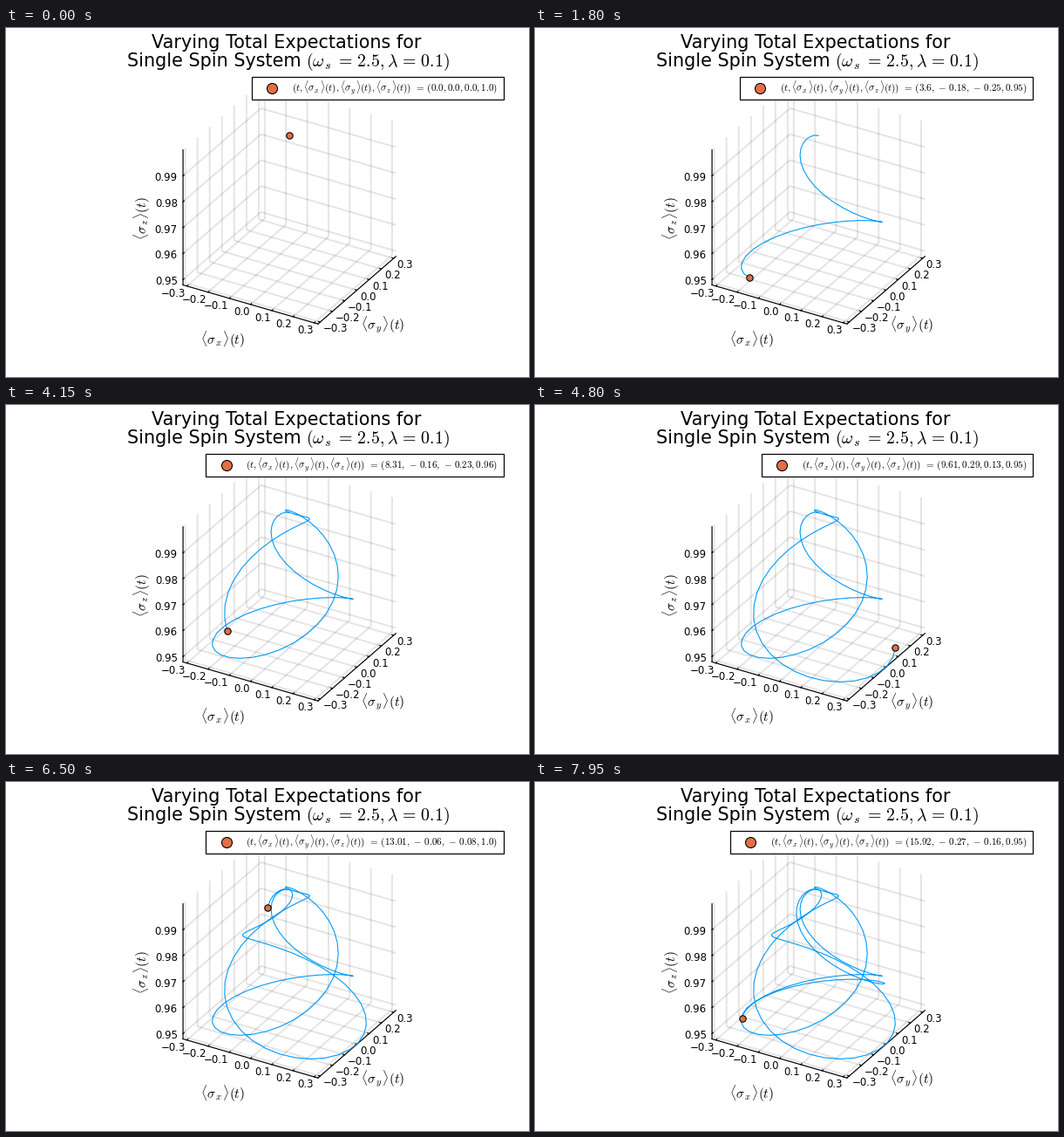
A matplotlib script for the animation above (8000 ms loop, 600 by 400 pixels).

```python
import numpy as np
import matplotlib.pyplot as plt
from matplotlib.animation import FuncAnimation
from matplotlib.patches import Rectangle

plt.rcParams["font.family"] = "DejaVu Sans"
plt.rcParams["mathtext.fontset"] = "cm"

W, H, DPI = 600, 400, 100
FRAMES, INTERVAL = 160, 50
PX = 72 / DPI
TITLE, TICK, GUIDE, LEGEND = 14.93, 8.5, 11, 8

# Spin precessing at OMEGA_S under a weak rotating field
OMEGA_S, OMEGA_D, DRIVE = 2.5, 1.5, 0.1635
T = np.linspace(0, 100, 1000)


def spin(t):
    detune = OMEGA_S - OMEGA_D
    rabi = np.hypot(detune, DRIVE)
    sin_a, cos_a = DRIVE / rabi, detune / rabi
    c, s = np.cos(rabi * t / 2), np.sin(rabi * t / 2)
    xy = 0 - 2 * sin_a * s * (c + 1j * cos_a * s) * np.exp(1j * OMEGA_D * t)
    return xy.real, xy.imag, 1 - 2 * (sin_a * s) ** 2


X, Y, Z = spin(T)
LIMS = [(v.min(), v.max()) for v in (X, Y, Z)]

# Orthographic view: azimuth 30, elevation 30
SIDE, CX, CY = 178.8, 325.2, 200.7
C30 = np.cos(np.pi / 6)


def project(x, y, z):
    u, v, w = [(a - lo) / (hi - lo) - 0.5
               for a, (lo, hi) in zip((x, y, z), LIMS)]
    return (CX + SIDE * (C30 * u + 0.5 * v),
            CY + SIDE * (0.25 * u - 0.5 * C30 * v - C30 * w))


fig = plt.figure(figsize=(W / DPI, H / DPI), dpi=DPI, facecolor="white")
ax = fig.add_axes([0, 0, 1, 1])
ax.set_xlim(0, W)
ax.set_ylim(H, 0)
ax.axis("off")


def line3(p, q, **kw):
    (x0, y0), (x1, y1) = project(*p), project(*q)
    ax.plot([x0, x1], [y0, y1], snap=False, **kw)


def text(x, y, s, size, **kw):
    return ax.text(x, y, s, fontsize=size, **kw)


def roomy(s):
    """Widen the gaps around math operators."""
    for op in "=-":
        s = s.replace(op, rf"\hspace{{0.14}}{op}\hspace{{0.14}}")
    return f"${s}$"


def sub(base, index):
    return rf"{base}_{{\hspace{{0.15}}{index}\hspace{{0.15}}}}"


def mean(axis):
    return rf"\langle{sub(chr(92) + 'sigma', axis)}\rangle(t)"


(x0, x1), (y0, y1), (z0, z1) = LIMS
XY_TICKS = np.arange(-3, 4) / 10
Z_TICKS = np.arange(95, 100) / 100
GRID = dict(color="black", alpha=0.1, lw=2 * PX, solid_capstyle="butt", zorder=1)
AXIS = dict(color="black", lw=1.2 * PX, zorder=2)

for v in XY_TICKS:
    line3((v, y0, z0), (v, y1, z0), **GRID)
    line3((v, y1, z0), (v, y1, z1), **GRID)
    line3((x0, v, z0), (x1, v, z0), **GRID)
    line3((x0, v, z0), (x0, v, z1), **GRID)
for v in Z_TICKS:
    line3((x0, y0, v), (x0, y1, v), **GRID)
    line3((x0, y1, v), (x1, y1, v), **GRID)

line3((x0, y0, z0), (x1, y0, z0), **AXIS)
line3((x1, y0, z0), (x1, y1, z0), **AXIS)
line3((x0, y0, z0), (x0, y0, z1), **AXIS)

STUB = 0.0125 * (x1 - x0)
MID = dict(va="center_baseline")
for v in XY_TICKS:
    label = f"{v:.1f}".replace("-", "\u2212")
    line3((v, y0, z0), (v, y0 + STUB, z0), **AXIS)
    px, py = project(v, y0, z0)
    text(px - 1.2, py + 7.2, label, TICK, ha="right", **MID)
    line3((x1, v, z0), (x1 - STUB, v, z0), **AXIS)
    px, py = project(x1, v, z0)
    text(px + 3.7, py + 6.2, label, TICK, ha="left", **MID)
for v in Z_TICKS:
    line3((x0, y0, v), (x0, y0 + STUB, v), **AXIS)
    px, py = project(x0, y0, v)
    text(px - 6.3, py + 0.8, f"{v:.2f}", TICK, ha="right", **MID)

text(248.5, 363, f"${mean('x')}$", GUIDE, ha="center")
text(432.3, 345.7, f"${mean('y')}$", GUIDE, ha="center")
text(167.5, 218, f"${mean('z')}$", GUIDE, ha="right", va="center", rotation=90)

text(322, 23, "Varying Total Expectations for", TITLE, ha="center")
text(139, 43.7, "Single Spin System", TITLE, ha="left")
params = rf"({sub(chr(92) + 'omega', 's')} = 2.5, \lambda = 0.1)"
text(509, 43.5, roomy(params), 14.3, ha="right")

curve, = ax.plot([], [], color="#009AF9", lw=1.1 * PX, zorder=3)
DOT = dict(marker="o", ls="", mfc="#E26F46", mec="black", mew=1.1 * PX)
dot, = ax.plot([], [], ms=7.4 * PX, zorder=4, **DOT)

LEG_RIGHT, LEG_TOP, LEG_BOTTOM = 570.5, 56, 82
box = ax.add_patch(Rectangle((0, LEG_TOP), 1, LEG_BOTTOM - LEG_TOP, fc="white",
                             ec="black", lw=1.2 * PX, zorder=5))
key, = ax.plot([], [], ms=12 * PX, zorder=6, **DOT)
entry = text(LEG_RIGHT - 6.5, 72.5, "", LEGEND, ha="right", zorder=6)
NAMES = "(t," + ",".join(mean(a) for a in "xyz") + ")"


def draw(i):
    px, py = project(X[:i + 1], Y[:i + 1], Z[:i + 1])
    curve.set_data(px, py)
    dot.set_data(px[-1:], py[-1:])

    values = ", ".join(str(round(float(a[i]), 2)) for a in (T, X, Y, Z))
    entry.set_text(roomy(rf"{NAMES}\ = ({values})"))
    width = entry.get_window_extent(fig.canvas.get_renderer()).width
    left = LEG_RIGHT - 6.5 - width - 46
    box.set_x(left)
    box.set_width(LEG_RIGHT - left)
    key.set_data([left + 23.5], [69.3])
    return curve, dot, box, key, entry


anim = FuncAnimation(fig, draw, frames=FRAMES, interval=INTERVAL,
                     repeat=True, repeat_delay=0, blit=False)
plt.show()
```
